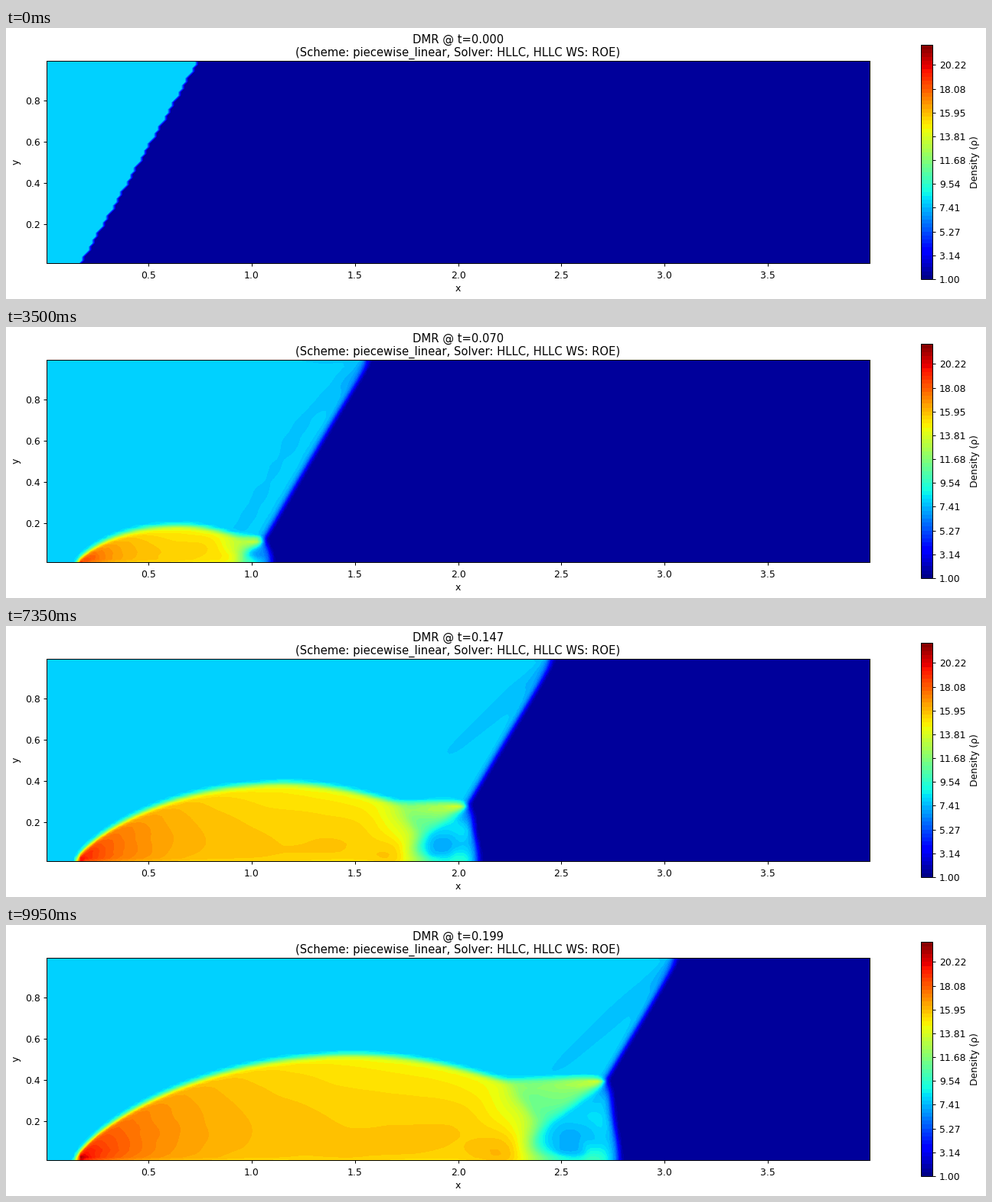
Recreate the animation shown at these times as a matplotlib script. Size 1280 by 355 pixels, loop 10000 ms.

```python
import numpy as np
import matplotlib.pyplot as plt
from matplotlib.animation import FuncAnimation
from matplotlib.cm import ScalarMappable
from matplotlib.colors import ListedColormap, Normalize

# Double Mach reflection: 2D Euler equations, minmod slopes, HLLC fluxes
GAMMA = 1.4
NX, NY = 240, 60
DX = 1 / 60
FRAMES, FRAME_DT = 200, 0.001
RAMP = 1 / 6
POST = np.array([8.0, 8.25 * np.cos(np.pi / 6), -4.125, 116.5])
PRE = np.array([1.4, 0.0, 0.0, 1.0])

x = (np.arange(NX) + 0.5) * DX
y = (np.arange(NY) + 0.5) * DX


def shock_x(y, t):
    return RAMP + (y + 20 * t) / np.sqrt(3)


def active_columns(t):
    """Columns the shock can have reached; beyond them the gas is at rest."""
    return min(NX, int(shock_x(1.05, t) / DX) + 8)


def shock_state(x, y, t):
    behind = x < shock_x(y, t)
    return np.where(behind, POST[:, None, None], PRE[:, None, None])


def energy(w):
    return w[3] / (GAMMA - 1) + 0.5 * w[0] * (w[1] ** 2 + w[2] ** 2)


def conserved(w):
    return np.stack([w[0], w[0] * w[1], w[0] * w[2], energy(w)])


def primitive(q):
    u, v = q[1] / q[0], q[2] / q[0]
    p = (GAMMA - 1) * (q[3] - 0.5 * (q[1] * u + q[2] * v))
    return np.stack([q[0], u, v, np.maximum(p, 1e-3)])


def sound(w):
    return np.sqrt(GAMMA * w[3] / w[0])


def hllc(left, right):
    rl, ul, vl, pl = left
    rr, ur, vr, pr = right
    wl, wr = np.sqrt(rl), np.sqrt(rr)

    def roe(a, b):
        return (wl * a + wr * b) / (wl + wr)

    u, v = roe(ul, ur), roe(vl, vr)
    h = roe((energy(left) + pl) / rl, (energy(right) + pr) / rr)
    c = np.sqrt((GAMMA - 1) * (h - 0.5 * (u * u + v * v)))
    sl = np.minimum(ul - sound(left), u - c)
    sr = np.maximum(ur + sound(right), u + c)
    ml, mr = rl * (sl - ul), rr * (sr - ur)
    sm = (pr - pl + ml * ul - mr * ur) / (ml - mr)

    # Only the side upwind of the contact wave contributes
    from_left = sm >= 0
    w = np.where(from_left, left, right)
    r, un, ut, p = w
    s = np.where(from_left, sl, sr)
    q = conserved(w)
    flux = un * q
    flux[1] += p
    flux[3] += un * p
    e_star = q[3] / r + (sm - un) * (sm + p / (r * (s - un)))
    star = r * (s - un) / (s - sm) * np.stack([np.ones_like(r), sm, ut, e_star])
    s = np.where(from_left, np.minimum(s, 0), np.maximum(s, 0))
    return flux + s * (star - q)


def flux_difference(w):
    d = np.diff(w, axis=-1)
    a, b = d[..., :-1], d[..., 1:]
    half = 0.25 * (np.sign(a) + np.sign(b)) * np.minimum(np.abs(a), np.abs(b))
    mid = w[..., 1:-1]
    return np.diff(hllc((mid + half)[..., :-1], (mid - half)[..., 1:]), axis=-1)


def swap_axes(w):
    return np.ascontiguousarray(w[[0, 2, 1, 3]].transpose(0, 2, 1))


def rate(q, t):
    n = q.shape[2]
    w = np.empty((4, NY + 4, n + 4))
    w[:, 2:-2, 2:-2] = primitive(q)
    w[:, 2:-2, :2] = POST[:, None, None]
    w[:, 2:-2, -2:] = w[:, 2:-2, -3:-2]
    # Reflecting wall beyond the ramp corner, exact shock along the top
    wall = w[:, 3:1:-1, 2:-2] * np.array([1, 1, -1, 1])[:, None, None]
    w[:, :2, 2:-2] = np.where(x[:n] < RAMP, POST[:, None, None], wall)
    y_top = 1 + (np.arange(2)[:, None] + 0.5) * DX
    w[:, -2:, 2:-2] = shock_state(x[None, :n], y_top, t)
    fx = flux_difference(w[:, 2:-2, :])
    fy = swap_axes(flux_difference(swap_axes(w[:, :, 2:-2])))
    return -(fx + fy) / DX


def simulate():
    q = conserved(shock_state(x[None, :], y[:, None], 0))
    densities = [q[0].copy()]
    for k in range(FRAMES - 1):
        t = k * FRAME_DT
        n = active_columns(t + FRAME_DT)
        part = q[:, :, :n].copy()
        w = primitive(part)
        speed = np.max(np.abs(w[1]) + np.abs(w[2]) + 2 * sound(w))
        steps = int(np.ceil(speed * FRAME_DT / DX / 0.75))
        dt = FRAME_DT / steps
        for _ in range(steps):
            guess = part + dt * rate(part, t)
            part = 0.5 * (part + guess + dt * rate(guess, t + dt))
            t += dt
        q[:, :, :n] = part
        densities.append(q[0].copy())
    return densities


density = simulate()

W, H, DPI = 1280, 355, 80
S = 10 / 9
plt.rcParams.update({
    "font.family": "DejaVu Sans", "font.size": 10 * S,
    "axes.titlesize": 12 * S, "axes.titlepad": 4.8 * S,
    "axes.labelpad": 4 * S, "axes.linewidth": 0.8 * S,
    "xtick.major.pad": 4.5 * S, "ytick.major.pad": 3.5 * S,
})
for axis in ("xtick", "ytick"):
    plt.rcParams.update({axis + ".major.size": 3.5 * S,
                         axis + ".major.width": 0.8 * S})

fig = plt.figure(figsize=(W / DPI, H / DPI), dpi=DPI, facecolor="white")


def pixel_axes(left, top, width, height):
    return fig.add_axes([left / W, 1 - (top + height) / H, width / W, height / H])


levels = np.linspace(1, 22, 60)
norm = Normalize(1, 22)
centers = (levels[:-1] + levels[1:]) / 2
bands = ListedColormap(plt.get_cmap("jet")(norm(centers)))

ax = pixel_axes(53.1, 43.1, 1074.8, 265.3)
ax.set_facecolor(bands(norm(PRE[0])))
ax.set(xlim=(x[0], x[-1]), ylim=(y[0], y[-1]), ylabel="y",
       xticks=np.arange(0.5, 4, 0.5), yticks=[0.2, 0.4, 0.6, 0.8])
ax.set_xlabel("x", labelpad=3.4 * S)
title = ax.set_title("")

bar = fig.colorbar(ScalarMappable(norm, bands),
                   cax=pixel_axes(1195.1, 22.4, 15.3, 306.6),
                   ticks=levels[::6], format="%.2f")
bar.set_label("Density (ρ)")


def update(k):
    for old in list(ax.collections):
        old.remove()
    t = k * FRAME_DT
    n = active_columns(t)
    rho = np.minimum(density[k][:, :n], 21.99)
    ax.contourf(x[:n], y, rho, levels, cmap="jet", norm=norm)
    title.set_text(f"DMR @ t={t:.3f}\n"
                   "(Scheme: piecewise_linear, Solver: HLLC, HLLC WS: ROE)")


anim = FuncAnimation(fig, update, frames=FRAMES, interval=50,
                     repeat=True, repeat_delay=0)
plt.show()
```
